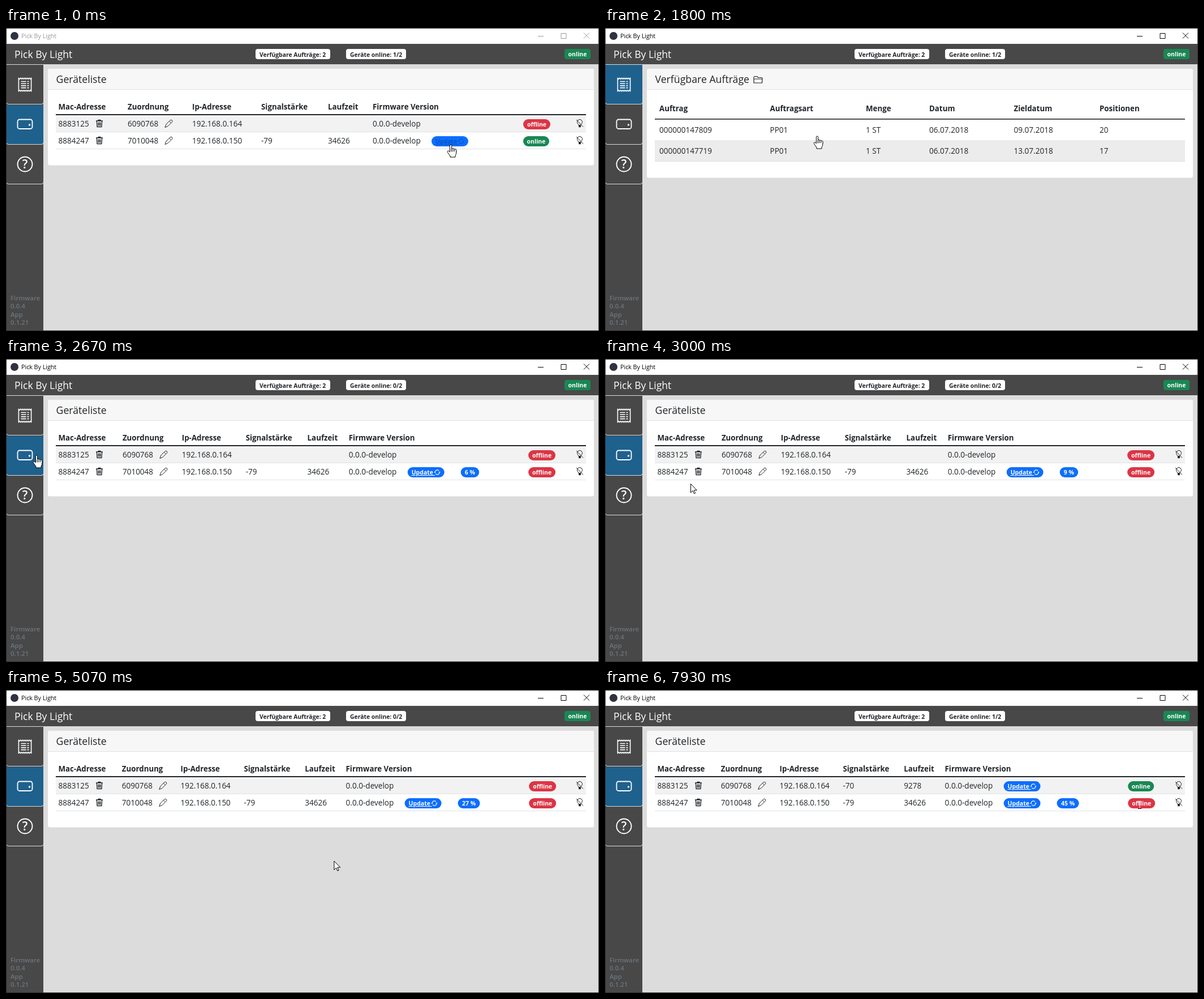
Animation, 1048 px wide and 535 px high, one loop 8000 ms. Source, as an HTML page:

```html
<!DOCTYPE html>
<html lang="de">
<head>
<meta charset="utf-8">
<title>Pick By Light</title>
<style>
  html, body { margin: 0; width: 100%; height: 100%; overflow: hidden; background: #dcdcdc; }
  svg { display: block; width: 1048px; height: 535px; font-family: "Open Sans", "Noto Sans", sans-serif; }
  text { white-space: pre; }
</style>
</head>
<body>
<svg id="stage" viewBox="0 0 1048 535"></svg>
<script>
const LOOP = 8000, STEP = 200 / 3;
const INK = '#212529', BLUE = '#0d6efd', RED = '#dc3545', GREEN = '#198754';
const BAR = '#484848', ACTIVE = '#1f618d', LINE = '#dee2e6';
const stage = document.getElementById('stage');

// Times at which the view changes
const FOCUS = 800, ORDERS = 930, OFFLINE = 2260, DEVICES = 2660, ONLINE = 6060;

// The pointer rests between moves; power > 1 eases out
const START = { x: 786, y: 206 };
const MOVES = [
  { from: 60, to: 130, x: 785, y: 204 },
  { from: 799, to: 800, x: 500, y: 207 },
  { from: 1667, to: 1800, x: 375, y: 191 },
  { from: 1800, to: 2133, x: 84, y: 181 },
  { from: 2133, to: 2533, x: 54, y: 170, power: 2 },
  { from: 2667, to: 3000, x: 151, y: 220 },
  { from: 3000, to: 5867, x: 582, y: 302, power: 4 },
  { from: 7267, to: 7400, x: 624, y: 277 },
  { from: 7533, to: 7930, x: 945, y: 203 }
];

function pointerAt(t) {
  let { x, y } = START;
  for (const move of MOVES) {
    const u = Math.min(1, Math.max(0, (t - move.from) / (move.to - move.from)));
    const eased = 1 - (1 - u) ** (move.power || 1);
    x += (move.x - x) * eased;
    y += (move.y - y) * eased;
  }
  return { x, y };
}

// The upload slows down once the second device connects
const percentAt = t => Math.round(Math.min(9 + (t - 3000) / 112, 37 + (t - ONLINE) / 233));

const rect = (x, y, w, h, fill, rx = 0, more = '') =>
  `<rect x="${x}" y="${y}" width="${w}" height="${h}" fill="${fill}" rx="${rx}" ${more}/>`;
const circle = (x, y, r, fill, more = '') => `<circle cx="${x}" cy="${y}" r="${r}" fill="${fill}" ${more}/>`;
const text = (x, y, s, size = 13.55, weight = 400, fill = INK, more = '') =>
  `<text x="${x}" y="${y}" font-size="${size}" font-weight="${weight}" fill="${fill}" ${more}>${s}</text>`;
const heads = (xs, y, labels) => labels.map((s, i) => text(xs[i], y, s, 13.3, 700)).join('');
const icon = (x, y, d, color = INK, width = 1, fill = 'none') =>
  `<path transform="translate(${x} ${y})" d="${d}" fill="${fill}" stroke="${color}" stroke-width="${width}" stroke-linejoin="round"/>`;
const badge = (x, y, w, s, fill, rx = 9) =>
  rect(x, y - 9, w, 18, fill, rx) + text(x + w / 2, y + 4, s, 10.5, 700, '#fff', 'text-anchor="middle"');
const counter = (x, w, s) => rect(x, 37, w, 18, '#fff', 4) + text(x + 7, 50.5, s, 10.4, 700);

const TRASH = 'M-6-4.5H6M-2-5V-6H2V-5M-4.7-4.5-4 6H4L4.7-4.5M-2-2V4M0-2V4M2-2V4';
const PENCIL = 'M-6.5 6.5-4.5 1 2.5-6Q4.5-7.5 6-6T5.5-2.5L-1.5 4.5ZM1-4.5 4-1.5';
const FOLDER = 'M-7.5 5.5V-4.5Q-7.5-6-6-6H-2L0-4H6Q7.5-4 7.5-2.5L7 5.5Z M-7.5-1.5H7.5';

function receipt(x, y) {
  const teeth = Array.from({ length: 13 }, (_, i) => [i * 1.85 - 11.1, i % 2 ? 9.8 : 11.8]);
  const outline = [...teeth.map(([a, b]) => [a, -b]), ...teeth.reverse()];
  let lines = '';
  for (let row = -5.5; row < 7; row += 3.7) lines += `M-7 ${row}H2M4 ${row}H7`;
  return icon(x, y, 'M' + outline.join('L') + 'Z' + lines, '#fff', 1.6);
}

const bulb = (x, y) =>
  icon(x, y, 'M-2 3Q-2.5 1.5-3.6.2A4.5 4.5 0 1 1 3.6.2Q2.5 1.5 2 3ZM-6-6.5 6 6') +
  rect(x - 2, y + 3, 4, 3.8, INK, 1);

function updateButton(x, y, color = '#fff') {
  const arrow = turn => `<g transform="translate(${x + 52.5} ${y}) rotate(${turn})">` +
    icon(0, 0, 'M-4-.5A4 4 0 0 1 3-2.7', color, 1.2) + icon(0, 0, 'M2.2-.7H5.8L4 1.3Z', 'none', 0, color) + '</g>';
  return rect(x, y - 9, 65, 18, BLUE, 9) +
    text(x + 7, y + 4, 'Update ', 10.5, 700, color, 'text-decoration="underline"') + arrow(0) + arrow(180);
}

function titleBar(focused) {
  const ink = focused ? '#000' : '#999';
  return rect(0, 0, 1048, 28, '#fff') + circle(15, 14, 7, '#2f3241') +
    text(27, 18, 'Pick By Light', 10.7, 400, ink) +
    icon(945, 14, 'M-5 .5H5', ink) + icon(985, 13.5, 'M-4-4h9v9h-9Z', ink) +
    icon(1026, 13.5, 'M-5-5 5 5M-5 5 5-5', ink);
}

function sidebar(orders) {
  const button = (i, active) => {
    const top = Math.round(64.4 + 70.4 * i), bottom = Math.round(134.4 + 70.4 * i);
    return rect(1, top + 1, 65, bottom - top, active ? ACTIVE : BAR) +
      icon(0, bottom, 'M1.5-2Q1.5.5 4 .5H63Q65.5.5 65.5-2', '#dcdcdc');
  };
  return rect(0, 64, 66, 471, BAR) + button(0, orders) + button(1, !orders) + button(2, false) +
    rect(1, 64, 65, 1, '#dcdcdc') + receipt(33.5, 100) +
    rect(20.5, 161.5, 26, 16.5, 'none', 3.5, 'stroke="#fff" stroke-width="1.8"') + circle(41.5, 171, 1.7, '#fff') +
    circle(33.5, 240.5, 13, 'none', 'stroke="#fff" stroke-width="1.9"') +
    text(33.5, 248, '?', 21, 600, '#fff', 'text-anchor="middle"') +
    ['Firmware', '0.0.4', 'App', '0.1.21'].map((s, i) => text(8, 481 + 14.4 * i, s, 11.4, 600, '#6c757d')).join('');
}

function card(title, height) {
  return rect(74, 72, 965, height, '#fff', 3.5) +
    rect(74, 72, 965, 36, '#f7f7f7', 3.5) + rect(74, 108, 965, 1, '#dfdfdf') +
    text(88.5, 97.3, title, 17.7, 500);
}

const orderRow = ({ x, y }) => x > 88 && x < 1025 && y > 161 && y < 235 ? Math.floor((y - 161) / 37) : -1;

function orderPage(t) {
  const xs = [96, 291.5, 461, 573, 722.5, 874];
  const rows = [
    ['000000147809', 'PP01', '1 ST', '06.07.2018', '09.07.2018', '20'],
    ['000000147719', 'PP01', '1 ST', '06.07.2018', '13.07.2018', '17']
  ];
  // The highlight trails the pointer by one step
  const hover = orderRow(pointerAt(t - STEP));
  return card('Verfügbare Aufträge', 192.5) + icon(270.5, 91.5, FOLDER, INK, 1.2) +
    heads(xs, 147, ['Auftrag', 'Auftragsart', 'Menge', 'Datum', 'Zieldatum', 'Positionen']) +
    rows.map((cells, i) => {
      const y = 161 + 37 * i;
      return rect(88, y, 937, 37, i === hover ? '#ececec' : '#fff') + rect(88, y + 37, 937, 1, LINE) +
        cells.map((s, c) => text(xs[c], y + 24, s)).join('');
    }).join('') +
    rect(88, 160, 937, hover < 0 ? 1 : 1.6, INK);
}

function devicePage(t) {
  const updating = t >= DEVICES, online = t >= ONLINE, percent = percentAt(t);
  // The progress badge squeezes the columns to its left
  const squeeze = !updating ? 0 : percent < 10 ? 9.1 : 10.2;
  const xs = [92.5, 215, 329, 451, 569, 648].map((x, i) => x - squeeze * Math.min(i, 4.65));
  const update = xs[5] + 104, state = 914 + squeeze;
  const rows = [
    ['8883125', '6090768', '192.168.0.164', online ? '-70' : '', online ? '9278' : '', '0.0.0-develop'],
    ['8884247', '7010048', '192.168.0.150', '-79', '34626', '0.0.0-develop']
  ];
  const status = (y, on) => on ? badge(state, y, 46, 'online', GREEN) : badge(state, y, 48, 'offline', RED);
  return card('Geräteliste', 170.5) +
    heads(xs, 143.5, ['Mac-Adresse', 'Zuordnung', 'Ip-Adresse', 'Signalstärke', 'Laufzeit', 'Firmware Version']) +
    rows.map((cells, i) => {
      const y = 154 + 30 * i;
      return rect(88, y, 937, 29, i ? '#fff' : '#f2f2f2') + rect(88, y + 29, 937, 1, LINE) +
        cells.map((s, c) => text(xs[c], y + 20, s)).join('') +
        icon(165, y + 14.5, TRASH, INK, 1.3) + icon(xs[1] + 72.5, y + 15, PENCIL) + bulb(1014, y + 14.5);
    }).join('') +
    rect(88, 152, 937, 2, INK) +
    (online ? updateButton(update, 170) : '') +
    updateButton(update, 200, updating ? '#fff' : '#0a53c4') +
    (updating ? badge(update + 94, 200, percent < 10 ? 32.5 : 39, percent + ' %', BLUE) : '') +
    status(170, online) + status(200, !updating);
}

function hand(x, y) {
  const finger = (left, top) => rect(x + left, y + top, 3.2, 14 - top, '#fff', 1.6, 'stroke="#000"');
  return [0, 6.3, 7, 8].map((top, i) => finger(i * 2.8 - 1.6, top)).join('') +
    icon(x, y, 'M-1.6 13-4 10.8Q-6.8 11-5.3 13.8L-1 20V22H8V19.5Q10 17 10 11.5', '#000', 1, '#fff');
}

const arrow = (x, y) =>
  icon(x + .5, y + .5, 'M0 0V15.5L3.6 12 6 17.3 8.2 16.3 5.9 11.2H10.8Z', '#000', 1, '#fff');

const textCursor = (x, y) =>
  icon(x, y, 'M0-6V6M-3-6.5H3', '#fff') + icon(x, y, 'M-3 6.5H-1L0 6 1 6.5H3', '#000');

function pointer(t, orders) {
  const { x, y } = pointerAt(t);
  if (t > ONLINE && x > 930) return textCursor(x, y);
  const clickable = t < FOCUS || x < 66 || orders && orderRow({ x, y }) >= 0;
  return clickable ? hand(x, y) : arrow(x, y);
}

function frame(t) {
  const orders = t >= ORDERS && t < DEVICES;
  const ready = t >= OFFLINE && t < ONLINE ? 0 : 1;
  return titleBar(t >= FOCUS) +
    rect(0, 28, 1048, 36, BAR) + text(15, 53, 'Pick By Light', 17.6, 400, '#fff') +
    counter(441, 132, 'Verfügbare Aufträge: 2') + counter(601, 106, `Geräte online: ${ready}/2`) +
    badge(987, 46, 46, 'online', GREEN, 4) +
    sidebar(orders) + (orders ? orderPage(t) : devicePage(t)) + pointer(t, orders) +
    rect(.5, .5, 1047, 534, 'none', 0, 'stroke="#2b2b2b"');
}

let shown = -1;
function tick() {
  const step = Math.floor((performance.now() % LOOP + 4) / STEP) % (LOOP / STEP);
  if (step !== shown) {
    shown = step;
    stage.innerHTML = frame(step * STEP);
  }
  requestAnimationFrame(tick);
}
tick();
</script>
</body>
</html>
```
